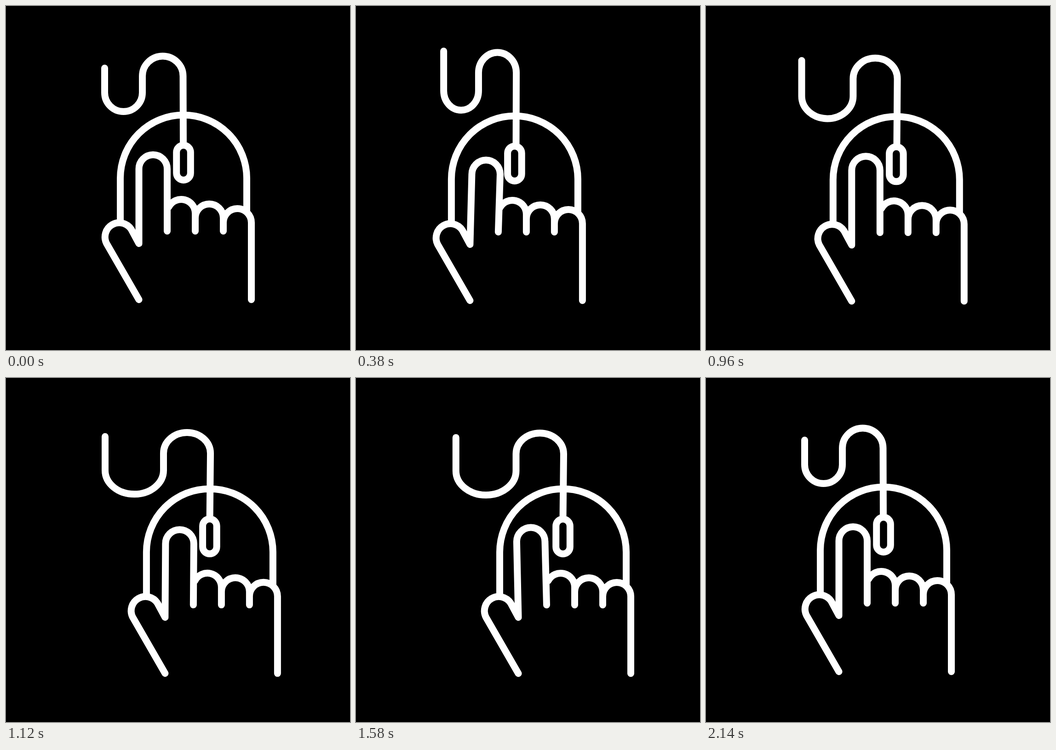
Write an HTML page that moves like this. It is 748 px wide and 748 px high and loops after 3020 ms.

```html
<!DOCTYPE html>
<html lang="en">
<head>
<meta charset="utf-8">
<title>Mouse and hand</title>
<style>
  html, body { margin: 0; width: 100%; height: 100%; overflow: hidden; background: #000; }
  svg { display: block; width: 100vw; height: 100vh; }
  path, rect { fill: none; stroke: #fff; stroke-width: 15; stroke-linejoin: round; }
  .round { stroke-linecap: round; }
</style>
</head>
<body>
<svg viewBox="0 0 748 748">
  <path id="cable" class="round"/>
  <g id="body">
    <path d="M248.5 472V374.5A137.5 137.5 0 0 1 523.5 374.5V448"/>
    <rect x="370.7" y="302.7" width="30.6" height="75.8" rx="15.3"/>
    <path id="thumb" class="round"/>
    <path class="round" d="M354 436.8A30.5 30.5 0 0 1 411.5 451V489.5M411.5 461A30.5 30.5 0 0 1 472.5 461V489.5M472.5 471A30.5 30.5 0 0 1 533.5 471V638.5"/>
  </g>
</svg>
<script>
const LOOP = 3020, STEP = 20;
const cable = document.getElementById('cable');
const body = document.getElementById('body');
const thumb = document.getElementById('thumb');

// body x, y | cable start x, y | low bend: side y, bottom y | middle x | high bend: side y, top y | right x | end x
const home  = [0, 0, 214.5, 135, 188.5, 229.5, 296.5, 152.5, 109, 385, 385.5];
const left  = [-41.7, 2, 190.3, 97.5, 184.5, 226.4, 266, 145, 100.9, 348, 347.5];
const right = [64, 4, 217.3, 129.4, 202, 254.5, 348, 165, 119.7, 451.5, 450];

const moves = [
  { from: home, to: left, start: 0, end: 460 },
  { from: left, to: right, start: 740, end: 1320 },
  { from: right, to: home, start: 1580, end: 2140 }
];

// time relative to the next move, drop, tilt
const click = [
  [-520, 0, 0],
  [-320, 10.8, 4.5],
  [-20, -2.6, -3.7],
  [180, 0, 0]
];
const clickTimes = [740, 1580];

const clamp = v => Math.min(1, Math.max(0, v));
const mix = (a, b, k) => a + (b - a) * k;
const smooth = u => u * u * (3 - 2 * u);

// cubic-bezier(.4, 0, .1, 1)
function glide(x) {
  let lo = 0, hi = 1;
  for (let i = 0; i < 24; i++) {
    const u = (lo + hi) / 2, v = 1 - u;
    if (1.2 * u * v * v + 0.3 * u * u * v + u * u * u < x) lo = u; else hi = u;
  }
  return smooth((lo + hi) / 2);
}

function poseAt(t) {
  const m = moves.filter(move => move.start <= t).pop();
  const x = clamp((t - m.start) / (m.end - m.start));
  const k = x === 0 || x === 1 ? x : glide(x);
  return m.from.map((v, i) => mix(v, m.to[i], k));
}

function fingerAt(t) {
  for (const at of clickTimes) {
    for (let i = 1; i < click.length; i++) {
      const [t0, drop0, tilt0] = click[i - 1];
      const [t1, drop1, tilt1] = click[i];
      const r = t - at;
      if (r >= t0 && r < t1) {
        const k = smooth((r - t0) / (t1 - t0));
        return [mix(drop0, drop1, k), mix(tilt0, tilt1, k)];
      }
    }
  }
  return [0, 0];
}

function draw(t) {
  const [dx, dy, sx, sy, lowY, bottom, midX, highY, top, rightX, endX] = poseAt(t);
  const [drop, tilt] = fingerAt(t);
  const y = 354.2 + drop;

  body.setAttribute('transform', `translate(${dx} ${dy})`);
  cable.setAttribute('d',
    `M${sx} ${sy}V${lowY}` +
    `A${(midX - sx) / 2} ${bottom - lowY} 0 0 0 ${midX} ${lowY}V${highY}` +
    `A${(rightX - midX) / 2} ${highY - top} 0 0 1 ${rightX} ${highY}` +
    `L${endX} ${302.5 + dy}`);
  thumb.setAttribute('d',
    'M289 638.5L218.7 516.5A31 31 0 0 1 272.3 485.5L289 516.5' +
    `L${289 + tilt} ${y}A30.75 30.75 0 0 1 ${350.5 + tilt} ${y}L350.5 489.5`);
}

const begin = performance.now();
function tick() {
  const t = (performance.now() - begin) % LOOP;
  draw(Math.floor(t / STEP) * STEP);
  requestAnimationFrame(tick);
}
tick();
</script>
</body>
</html>
```
